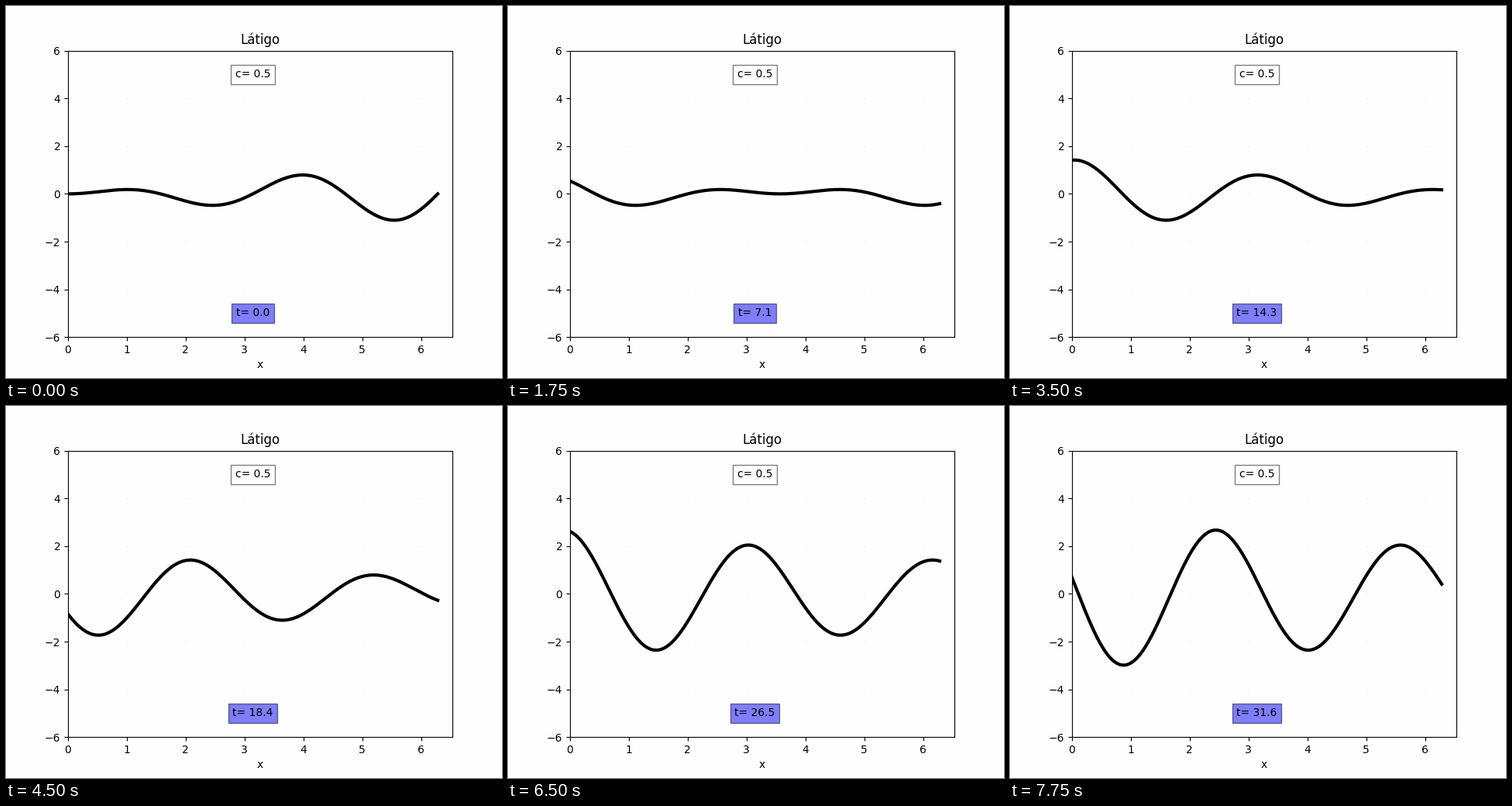
Recreate the animation shown at these times as a matplotlib script. Size 640x480 px, loop 8 s.

```python
import numpy as np
import matplotlib.pyplot as plt
from matplotlib.animation import FuncAnimation

FRAMES = 32
INTERVAL = 250
SPEED = 0.5
PAPER = "#fefefe"

plt.rcParams["font.family"] = "DejaVu Sans"

times = np.linspace(0, 50, 50)
x = np.linspace(0, 2 * np.pi, 200)


def wave(t):
    u = x - SPEED * t
    return 0.2 * u * np.sin(2 * u)


def label(y, text, color):
    return ax.text(np.pi, y, text, ha="center", va="center",
                   bbox=dict(facecolor=color, alpha=0.5))


fig, ax = plt.subplots(figsize=(6.4, 4.8), dpi=100, facecolor=PAPER)
ax.set_facecolor(PAPER)
ax.set_xlim(0, 2 * np.pi + 0.25)
ax.set_ylim(-6, 6)
ax.set_title("Látigo")
ax.set_xlabel("x")

# Faint marks where the grid lines would cross
gx, gy = np.meshgrid(np.arange(1, 7), np.arange(-4, 5, 2))
ax.plot(gx.ravel(), gy.ravel(), "s", color="#e8e8e8", ms=0.8, mew=0, zorder=0.5)

rope, = ax.plot(x, wave(0), color="black", lw=3)
label(5, f"c= {SPEED}", "white")
clock = label(-5, "t= 0.0", "blue")


def update(i):
    t = times[i]
    rope.set_ydata(wave(t))
    clock.set_text(f"t= {t:.1f}")
    return rope, clock


anim = FuncAnimation(fig, update, frames=FRAMES, interval=INTERVAL,
                     repeat=True, repeat_delay=0)
plt.show()
```
